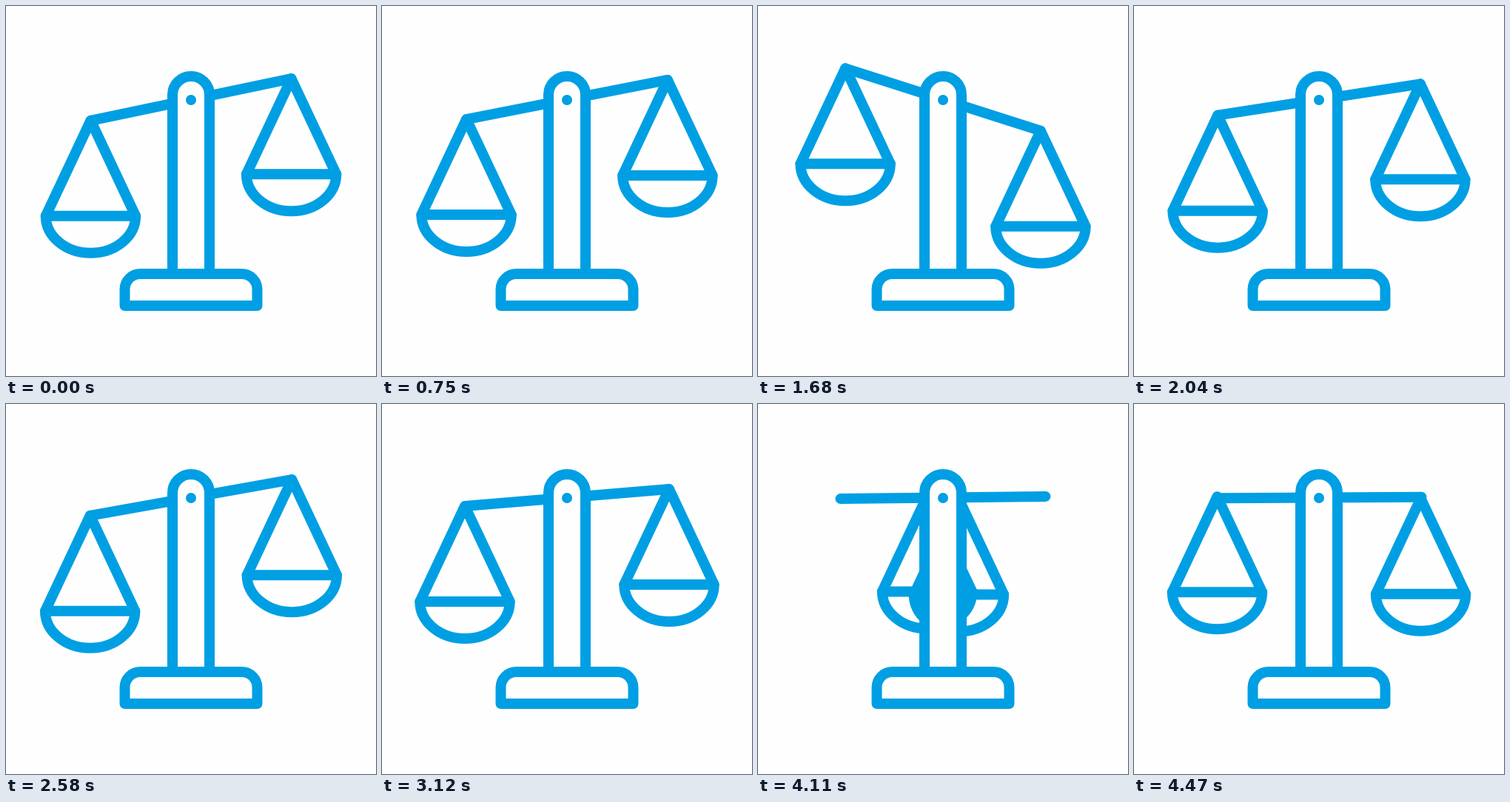
An HTML page with a canvas for the animation above (4.53 s loop, 500x500 px).

```html
<!DOCTYPE html>
<html lang="en">
<head>
<meta charset="utf-8">
<title>Balance scale</title>
<style>
  html, body { margin: 0; width: 100%; height: 100%; overflow: hidden; background: #fefefe; }
  canvas { display: block; width: 500px; height: 500px; }
</style>
</head>
<body>
<canvas id="stage" width="500" height="500"></canvas>
<script>
const ctx = document.getElementById('stage').getContext('2d');
const BLUE = '#009fe3', PAPER = '#fefefe';
const LOOP = 4530, STEP = 30, LAST = 4470;
const PIVOT = { x: 250, y: 126.5 }, ARM = 138.5;
const SWAP_START = 3630, SWAP_END = 4500;

// Beam tilt: [time in ms, degrees, lag of the ease towards this pose]
const TILT = [
  [600, -11.8], [1500, 18, 1.32], [1650, 18], [2290, -22.5], [2620, -9.6],
  [2710, -11.8], [2740, -11.8], [3500, 2.3], [3630, -1.15], [4500, -0.3]
];

const clamp = v => Math.min(1, Math.max(0, v));
const smooth = u => u * u * (3 - 2 * u);
const mix = (a, b, u) => a + (b - a) * u;

function tiltAt(time) {
  const next = TILT.findIndex(key => key[0] > time);
  if (next === 0) return TILT[0][1];
  const [t0, from] = TILT[next - 1];
  const [t1, to, lag = 1] = TILT[next];
  return mix(from, to, smooth(((time - t0) / (t1 - t0)) ** lag));
}

function beamEnd(degrees, side) {
  const a = degrees * Math.PI / 180;
  return { x: PIVOT.x + side * ARM * Math.cos(a), y: PIVOT.y + side * ARM * Math.sin(a) };
}

// The pans hang from the beam, then trade places along it.
function panAt(time, side) {
  const start = beamEnd(tiltAt(Math.min(time, SWAP_START)), side);
  const u = smooth(clamp((time - SWAP_START) / (SWAP_END - SWAP_START)));
  return {
    x: mix(start.x, PIVOT.x - side * ARM, u),
    y: mix(start.y, PIVOT.y - side * 1.3, u)
  };
}

function drawBeam(degrees) {
  const left = beamEnd(degrees, -1), right = beamEnd(degrees, 1);
  ctx.beginPath();
  ctx.moveTo(left.x, left.y);
  ctx.lineTo(right.x, right.y);
  ctx.stroke();
}

function drawPan({ x, y }) {
  const half = 60.7, rim = y + 129;
  ctx.beginPath();
  ctx.moveTo(x, y);
  ctx.lineTo(x + half, rim);
  ctx.lineTo(x - half, rim);
  ctx.closePath();
  ctx.stroke();
  ctx.beginPath();
  ctx.ellipse(x, rim, half, 50, 0, 0, Math.PI);
  ctx.stroke();
}

function drawStand() {
  ctx.beginPath();
  ctx.moveTo(225, 362);
  ctx.lineTo(225, 120);
  ctx.arc(250, 120, 25, Math.PI, 0);
  ctx.lineTo(275, 362);
  ctx.fillStyle = PAPER;
  ctx.fill();
  ctx.stroke();

  ctx.beginPath();
  ctx.moveTo(160.5, 405);
  ctx.arcTo(160.5, 362, 250, 362, 21);
  ctx.arcTo(339.5, 362, 339.5, 405, 21);
  ctx.lineTo(339.5, 405);
  ctx.closePath();
  ctx.fill();
  ctx.stroke();

  ctx.beginPath();
  ctx.arc(250, 127, 7, 0, Math.PI * 2);
  ctx.fillStyle = BLUE;
  ctx.fill();
}

function draw(time) {
  ctx.fillStyle = PAPER;
  ctx.fillRect(0, 0, 500, 500);
  ctx.strokeStyle = BLUE;
  ctx.lineWidth = 14;
  ctx.lineCap = ctx.lineJoin = 'round';
  drawBeam(tiltAt(time));
  drawPan(panAt(time, -1));
  drawPan(panAt(time, 1));
  drawStand();
}

let origin;
function tick(now) {
  origin ??= now;
  const time = Math.max(0, now - origin) % LOOP;
  draw(Math.min(LAST, Math.floor(time / STEP) * STEP));
  requestAnimationFrame(tick);
}
draw(0);
requestAnimationFrame(tick);
</script>
</body>
</html>
```
